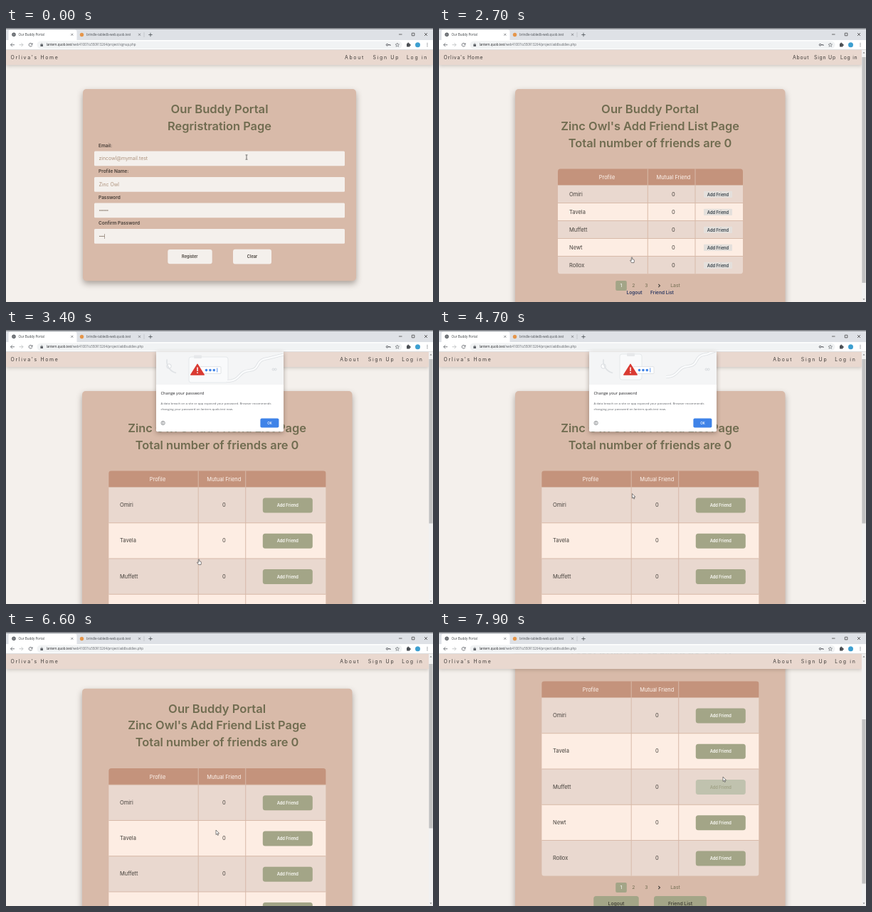
These frames come from a looping animation (600x386 px, 8000 ms). An HTML page with a canvas:

```html
<!DOCTYPE html>
<html lang="en">
<head>
<meta charset="utf-8">
<title>Our Buddy Portal</title>
<style>
html, body { margin: 0; width: 100%; height: 100%; overflow: hidden; background: #f4f0ec; }
canvas { display: block; width: 600px; height: 386px; }
</style>
</head>
<body>
<canvas id="stage"></canvas>
<script>
const W = 600, H = 386, LOOP = 8000, STEP = 100;
const canvas = document.getElementById('stage');
const ctx = canvas.getContext('2d');
const dpr = window.devicePixelRatio || 1;
canvas.width = W * dpr;
canvas.height = H * dpr;

const SANS = 'Inter, "Open Sans", sans-serif';
const UI = '"Open Sans", "Noto Sans", sans-serif';
const C = {
  page: '#f4f0ec', nav: '#e9d8cf', card: '#d8baa9', head: '#c4937c',
  rowA: '#e9d8cf', rowB: '#fdede3', green: '#a3a587', title: '#706c50',
  ink: '#45413c', grey: '#5f6368'
};
const SITE = 'lantern.quob.test';
const NAMES = ['Omiri', 'Tavela', 'Muffett', 'Newt', 'Rollox'];

const clamp = (v, a = 0, b = 1) => Math.min(b, Math.max(a, v));
const lerp = (a, b, p) => a + (b - a) * p;
const smooth = u => u * u * (3 - 2 * u);
const cubic = u => u < .5 ? 4 * u * u * u : 1 - Math.pow(2 - 2 * u, 3) / 2;
const span = (t, a, b) => clamp((t - a) / (b - a));
const inside = (p, x, y, w, h) => p.x >= x && p.x <= x + w && p.y >= y && p.y <= y + h;

function mix(a, b, p) {
  const part = (c, i) => parseInt(c.slice(i, i + 2), 16);
  return 'rgb(' + [1, 3, 5].map(i => Math.round(lerp(part(a, i), part(b, i), p))).join(',') + ')';
}

function box(x, y, w, h, fill, r = 0, stroke) {
  ctx.beginPath();
  ctx.roundRect(x, y, w, h, r);
  if (fill) { ctx.fillStyle = fill; ctx.fill(); }
  if (stroke) { ctx.strokeStyle = stroke; ctx.lineWidth = .7; ctx.stroke(); }
}

function disc(x, y, r, fill) {
  ctx.beginPath();
  ctx.arc(x, y, r, 0, Math.PI * 2);
  ctx.fillStyle = fill;
  ctx.fill();
}

function ring(x, y, r, color, width = .8, a = 0, b = Math.PI * 2) {
  ctx.beginPath();
  ctx.arc(x, y, r, a, b);
  ctx.strokeStyle = color;
  ctx.lineWidth = width;
  ctx.stroke();
}

function line(pts, color, width = .8) {
  ctx.beginPath();
  for (let i = 0; i < pts.length; i += 2) ctx.lineTo(pts[i], pts[i + 1]);
  ctx.strokeStyle = color;
  ctx.lineWidth = width;
  ctx.stroke();
}

function poly(pts, fill, stroke, width = .6) {
  ctx.beginPath();
  for (let i = 0; i < pts.length; i += 2) ctx.lineTo(pts[i], pts[i + 1]);
  ctx.closePath();
  if (fill) { ctx.fillStyle = fill; ctx.fill(); }
  if (stroke) { ctx.strokeStyle = stroke; ctx.lineWidth = width; ctx.stroke(); }
}

function text(s, x, y, size, color, o = {}) {
  ctx.font = (o.weight || 400) + ' ' + size + 'px ' + (o.font || SANS);
  ctx.textAlign = o.align || 'left';
  ctx.letterSpacing = (o.gap || 0) + 'px';
  ctx.fillStyle = color;
  ctx.fillText(s, x, y);
  ctx.letterSpacing = '0px';
}

const mid = (s, x, y, size, color, weight) => text(s, x, y, size, color, { align: 'center', weight });

function shadowed(blur, dy, alpha, draw) {
  ctx.save();
  ctx.shadowColor = 'rgba(60,45,35,' + alpha + ')';
  ctx.shadowBlur = blur * dpr;
  ctx.shadowOffsetY = dy * dpr;
  draw();
  ctx.restore();
}

function cross(x, y, r, color) {
  line([x - r, y - r, x + r, y + r], color, .7);
  line([x - r, y + r, x + r, y - r], color, .7);
}

function browser(path) {
  box(0, 0, W, 17, '#dee1e6');
  box(0, 0, W, 1.8, '#85888d');
  box(3.5, 2.5, 96, 15, '#fff', [3, 3, 0, 0]);
  disc(11, 9.3, 2.7, '#55595e');
  ring(11, 9.3, 1.2, '#d4d6d9', .5);
  text('Our Buddy Portal', 17.5, 11, 4.5, '#3c4043', { font: UI });
  cross(92.8, 9.3, 1.5, C.grey);
  disc(106.5, 9.5, 2.7, '#e5964b');
  text('brindle-tabledb-web.quob.test', 113, 11, 4.4, '#4b4f54', { font: UI });
  cross(187.5, 9.3, 1.5, C.grey);
  line([194, 6, 194, 13], '#a9acb1', .5);
  line([200.3, 9.5, 205.7, 9.5], '#4b4f54');
  line([203, 6.8, 203, 12.2], '#4b4f54');
  line([552, 9, 556.5, 9], '#333', .7);
  box(570.3, 7.2, 3.6, 3.6, null, 0, '#333');
  cross(590, 9, 2, '#333');

  box(0, 17, W, 13.5, '#fff');
  box(0, 30.2, W, .8, '#d3d3d5');
  line([12, 23.7, 6.5, 23.7], C.grey);
  line([9, 21.2, 6.5, 23.7, 9, 26.2], C.grey);
  line([18.5, 23.7, 24, 23.7], '#b8babd');
  line([21.5, 21.2, 24, 23.7, 21.5, 26.2], '#b8babd');
  ring(34.5, 23.7, 2.4, C.grey, .8, .3, 5.5);
  poly([37.4, 20.8, 37.4, 23.4, 34.9, 23.4], C.grey);
  box(43.5, 18.6, 513, 10.4, '#f1f3f4', 5.2);
  box(48.4, 23, 3.6, 3, C.grey, .5);
  ring(50.2, 23, 1.2, C.grey, .6, Math.PI, 0);
  text(SITE, 56.8, 25.4, 4.4, '#202124', { font: UI });
  const w = ctx.measureText(SITE).width;
  text(path, 56.8 + w, 25.4, 4.4, C.grey, { font: UI });
  ring(535.6, 23.7, 1.3, '#4b4f54', .9);
  line([537, 23.7, 540, 23.7, 540, 25], '#4b4f54', .9);
  const star = [];
  for (let i = 0; i < 10; i++) {
    const a = i * Math.PI / 5 - Math.PI / 2, r = i % 2 ? 1.3 : 2.9;
    star.push(549.8 + r * Math.cos(a), 23.9 + r * Math.sin(a));
  }
  poly(star, null, C.grey);
  box(563, 21.8, 4.6, 4.6, '#4b4f54', .6);
  disc(565.2, 21.5, 1, '#4b4f54');
  disc(567.8, 24, 1, '#4b4f54');
  disc(578.5, 23.7, 3.5, '#3d9fd0');
  for (const y of [21.6, 23.7, 25.8]) disc(592, y, .6, C.grey);
}

function nav(p, bar) {
  shadowed(5, 1.5, .22, () => box(0, 31, W - bar, 21, C.nav));
  const gap = lerp(.75, 1.7, p);
  const item = (s, a, b) => text(s, lerp(a, b, p), 43.7, 6.9, '#3f3b38', { gap });
  item("Orliva's Home", 6.5, 6.5);
  const dx = bar ? 0 : 6.7;
  item('About', 497, 469.3 + dx);
  item('Sign Up', 527, 508.8 + dx);
  item('Log in', 564, 556.3 + dx);
}

const FIELDS = ['Email:', 'Profile Name:', 'Password', 'Confirm Password'];
const fieldY = i => 173.6 + i * 36.5;

function dots(n, y) {
  for (let i = 0; i < n; i++) disc(131.7 + i * 1.87, y, .65, '#6b5849');
}

function signup(t, cur) {
  shadowed(9, 4, .4, () => box(108, 86, 384, 270.3, C.card, 5));
  mid('Our Buddy Portal', 300, 120, 16.6, C.title, 600);
  mid('Regristration Page', 300, 143.6, 16.4, C.title, 600);
  FIELDS.forEach((s, i) => {
    text(s, 130, fieldY(i) - 5.8, 6.5, '#453c36', { weight: 600 });
    box(124, fieldY(i), 352, 20.7, C.page, 1.5);
  });
  text('zincowl@mymail.test', 130.5, fieldY(0) + 12.8, 6.9, '#ad917b');
  text('Zinc Owl', 130.5, fieldY(1) + 12.8, 6.9, '#ad917b');
  const n = t < 100 ? 4 : t < 400 ? 5 : t < 600 ? 6 : 7;
  dots(7, 257);
  dots(n, 293.4);
  if (t < 1900) box(131 + n * 1.87, 290, .5, 7, '#6b5849');

  const over = inside(cur, 227, 311.7, 63, 20.6);
  const on = over ? smooth(span(t, 1600, 1900)) : 0;
  box(227.3, 311.9, 62.4, 20.4, mix(C.page, C.green, on), 3, t >= 1900 ? '#5f6a62' : null);
  mid('Register', 258.3, 324.1, 5.6, mix('#3f3933', '#f8f6f2', on), 600);
  box(319, 311.7, 54, 20.8, C.page, 3);
  mid('Clear', 346, 324.1, 5.6, '#3f3933', 600);
}

// p runs from the bare layout to the styled one
function friends(p, scroll, hover) {
  const L = (a, b) => lerp(a, b, p);
  ctx.save();
  ctx.translate(0, -scroll);
  shadowed(9, 4, .4, () => box(107, 86, 379.5, L(310, 459), C.card, 5));
  mid('Our Buddy Portal', 296.6, 120, 16.6, C.title, 600);
  mid("Zinc Owl's Add Friend List Page", 296.6, 143.6, 16.4, C.title, 600);
  mid('Total number of friends are 0', 296.6, 167.6, 16.4, C.title, 600);

  const x = L(167, 144.2), w = L(260, 305.4), rh = L(25, 50.25), top = 221.5;
  const c1 = L(293.3, 270.2), c2 = L(360, 336.7), m = (c1 + c2) / 2 + 2.8;
  ctx.save();
  ctx.beginPath();
  ctx.roundRect(x, 198.3, w, 23.2 + rh * 5, 4);
  ctx.clip();
  box(x, 198.3, w, 23, C.head);
  NAMES.forEach((_, i) => box(x, top + i * rh, w, rh, i % 2 ? C.rowB : C.rowA));
  for (let i = 0; i < 5; i++) box(x, top + i * rh - .5, w, 1, C.card);
  for (const c of [c1, c2]) box(c - .5, 198.3, 1, 23.2 + rh * 5, C.card);
  ctx.restore();
  mid('Profile', L(236, 213), 213, 7.4, '#fdf4ee');
  mid('Mutual Friend', m, 213, 7.4, '#fdf4ee');
  NAMES.forEach((s, i) => {
    const y = top + (i + .5) * rh;
    text(s, L(183, 160), y + 2.6, 7.5, C.ink);
    mid('0', m, y + 2.6, 7.5, C.ink);
    const bw = L(40, 70), bh = L(9.2, 21), bx = L(392, 395.8);
    const h = i === 2 ? hover : 0;
    const fill = p < 1 ? mix('#e4e0dc', C.green, p) : mix(C.green, '#c0c2ae', h);
    const ink = p < 1 ? mix('#37424a', '#fbfaf6', p) : mix('#fbfaf6', '#a0a286', h);
    box(bx - bw / 2, y + .4 - bh / 2, bw, bh, fill, L(1, 3.5));
    mid('Add Friend', bx, y + 2.5, 5.75, ink, 600);
  });

  const py = L(363, 489);
  box(248.2, py - 7, 15.6, 14, C.green, 2);
  mid('1', 256, py + 2.4, 6.8, '#fff');
  mid('2', 273.3, py + 2.4, 6.8, C.title);
  mid('3', 291.3, py + 2.4, 6.8, C.title);
  line([308.3, py - 2.2, 310.5, py, 308.3, py + 2.2], C.ink, 1.1);
  mid('Last', 332, py + 2.4, 6.8, C.title);
  const link = (s, a, b, bw) => {
    const cx = L(a, b), cy = L(373, 511.2), h = L(8, 20.6), half = L(18, bw / 2);
    ctx.globalAlpha = p;
    box(cx - half, cy - h / 2, half * 2, h, C.green, 3.5);
    ctx.globalAlpha = 1;
    mid(s, cx, cy + 2.3, L(6.5, 6.8), mix('#2e3a63', '#47463a', p), 600);
  };
  link('Logout', 274.5, 249, 63.5);
  link('Friend List', 313.5, 339, 74);
  ctx.restore();
}

function scrollbar(p, scroll) {
  box(594, 31, 6, H - 31, '#f1f1f1');
  poly([595.5, 35.5, 597, 33.8, 598.5, 35.5], '#777');
  poly([595.5, 381.5, 597, 383.2, 598.5, 381.5], '#777');
  box(594.4, 41 + scroll * .636, 5.2, lerp(318, 231.5, p), '#c1c1c1');
}

function artwork(k) {
  ctx.save();
  ctx.beginPath();
  ctx.rect(211, 31, 179, 46);
  ctx.clip();
  box(211, 31, 179, 46, '#f4f5f6');
  const pale = '#dfe2e5';
  box(lerp(257, 254, k), lerp(38, 34, k), lerp(55, 31, k), 36, '#f9fafb', 3, pale);
  box(lerp(264, 264, k), lerp(35.5, 32.5, k), 11, 4.5, '#e6e8ea', 1);
  disc(lerp(229, 231, k), 51, 3.2, '#fff');
  ring(lerp(229, 231, k), 51, 3.2, '#d0d4d8');
  ring(lerp(243, 248, k), 44, 17, pale, 1.6, 1.8, 3.3);
  const sx = lerp(0, 8, k), sy = lerp(0, -6, k);
  const wave = (color, width) => {
    ctx.beginPath();
    ctx.moveTo(311 + sx, 72 + sy);
    ctx.bezierCurveTo(330 + sx, 72 + sy, 326 + sx, 58 + sy, 342 + sx, 57 + sy);
    ctx.bezierCurveTo(358 + sx, 56 + sy, 349 + sx, 42 + sy, 368 + sx, 40 + sy);
    ctx.lineTo(392, 34 + sy);
    ctx.strokeStyle = color;
    ctx.lineWidth = width;
    ctx.stroke();
  };
  wave('#dde0e3', 4);
  wave('#fafbfc', 2.4);
  ring(375.5, 55.5, 1.4, '#d0d4d8');
  ring(378.7, 55.5, 1.4, '#d0d4d8');
  box(272, 51.7, 30, 9.8, '#fff', 1, '#d5d8dc');
  for (let i = 0; i < 3; i++) disc(281.5 + i * 5.4, 56.6, 1.8, '#4285e8');
  box(296.3, 53.6, .9, 6, '#4285e8');
  ctx.lineJoin = 'round';
  poly([269, 48.3, 278.3, 63, 259.7, 63], '#d93a32', '#d93a32', 1.4);
  ctx.lineJoin = 'miter';
  box(268.3, 52.5, 1.5, 5.4, '#fff');
  disc(269, 60.2, .9, '#fff');
  ctx.restore();
}

function dialog(t) {
  ctx.save();
  ctx.globalAlpha = span(t, 3000, 3200);
  shadowed(6, 2, .4, () => box(211, 30.5, 179, 112.8, '#fff', [0, 0, 2, 2]));
  artwork(smooth(span(t, 3400, 4500)));
  text('Change your password', 217.5, 90.6, 5.7, '#202124', { font: UI });
  text('A data breach on a site or app exposed your password. Browser recommends', 217.5, 104.6, 4.3, C.grey, { font: UI });
  text('changing your password on ' + SITE + ' now.', 217.5, 112.6, 4.3, C.grey, { font: UI });
  ring(220.6, 131, 2.6, C.grey, .7);
  box(220.2, 130.3, .8, 2.2, C.grey);
  box(220.2, 129, .8, .8, C.grey);
  box(357.4, 124.6, 26, 12.8, t >= 5400 ? '#5493f0' : '#3f83e8', 2);
  text('OK', 370.4, 132.8, 4.5, '#fff', { font: UI, align: 'center', weight: 600 });
  ctx.restore();
}

// time, x, y of the pointer tip
const PATH = [
  [1000, 338, 182], [1400, 315, 240], [1800, 271, 323], [4000, 271, 323],
  [4600, 267, 235], [5400, 369.5, 131], [5900, 369.5, 131],
  [6400, 308, 250], [6600, 295, 279], [7200, 295, 279], [7900, 399, 204]
];

function pointer(t) {
  let i = 0;
  while (i < PATH.length - 2 && t >= PATH[i + 1][0]) i++;
  const a = PATH[i], b = PATH[i + 1], u = smooth(span(t, a[0], b[0]));
  return { x: lerp(a[1], b[1], u), y: lerp(a[2], b[2], u) };
}

function cursorKind(t, p) {
  if (t < 1800) {
    if (FIELDS.some((_, i) => inside(p, 124, fieldY(i), 352, 20.7))) return 'beam';
    return inside(p, 227, 311.7, 63, 20.6) ? 'hand' : 'arrow';
  }
  if (t <= 4000) return 'hand';
  if (t < 6000) return inside(p, 357.4, 124.6, 26, 12.8) ? 'hand' : 'arrow';
  return t > 7200 && inside(p, 361, 208, 70, 21) ? 'hand' : 'arrow';
}

function cursor(t, p) {
  ctx.save();
  ctx.translate(p.x, p.y);
  ctx.lineJoin = 'round';
  const kind = cursorKind(t, p);
  if (kind === 'beam') {
    line([0, -3, 0, 3], '#333', .7);
    line([-1.5, -3.2, 1.5, -3.2], '#333', .6);
    line([-1.5, 3.2, 1.5, 3.2], '#333', .6);
  } else if (kind === 'hand') {
    poly([-.7, .3, 0, -.3, .7, .3, .7, 2.8, 2.9, 3.3, 3.4, 4.2, 3, 7.6, -.4, 7.6, -2.4, 4.6, -1.9, 3.9, -.7, 4.8], '#fff', '#333');
  } else {
    poly([0, 0, 0, 6.5, 1.5, 5.2, 2.5, 7.5, 3.5, 7, 2.5, 4.8, 4.5, 4.7], '#fff', '#333');
  }
  ctx.restore();
}

function draw(t) {
  ctx.setTransform(dpr, 0, 0, dpr, 0, 0);
  box(0, 0, W, H, C.page);
  const cur = pointer(t), joined = t >= 2700;
  if (joined) {
    const p = smooth(span(t, 2700, 3100));
    const scroll = 129 * cubic(span(t, 6480, 7000));
    friends(p, scroll, smooth(span(t, 7550, 7850)));
    nav(p, 6);
    scrollbar(p, scroll);
  } else {
    signup(t, cur);
    nav(1, 0);
  }
  browser(joined ? '/web41007/u550913264/project/addbuddies.php' : '/web41007/u550913264/project/signup.php');
  if (t >= 3100 && t < 6000) dialog(t);
  cursor(t, cur);
}

const start = performance.now();
function tick() {
  const t = (performance.now() - start) % LOOP;
  draw(Math.floor(t / STEP) * STEP);
  requestAnimationFrame(tick);
}
tick();
</script>
</body>
</html>
```
